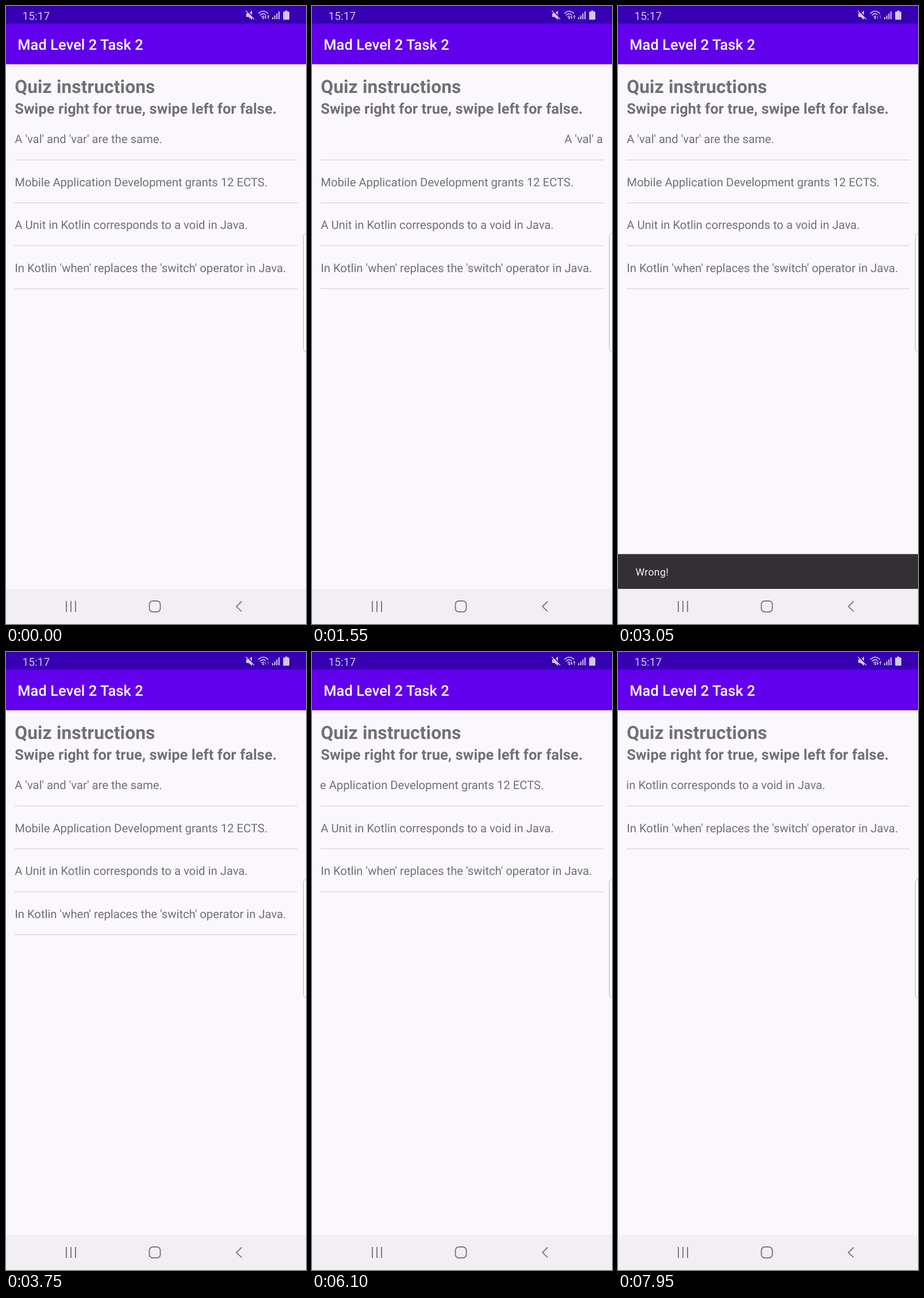
Recreate the animation shown at these times as an HTML page. Size 522x1073 px, loop 8000 ms.

```html
<!DOCTYPE html>
<html lang="en">
<head>
<meta charset="utf-8">
<title>Quiz</title>
<style>
  html, body { margin: 0; width: 100%; height: 100%; overflow: hidden; background: #faf8fc; }
  svg { display: block; width: 100%; height: 100%; }
  text { font-family: Roboto, Arial, sans-serif; text-rendering: geometricPrecision; white-space: pre; }
  .grey { fill: #717075; }
  .head { letter-spacing: .004em; }
  .item { font-size: 20.3px; letter-spacing: -.015px; }
  .nav { fill: none; stroke: #7f7d82; stroke-width: 2; }
  .status { fill: #d3c8ef; }
  .thin { fill: none; stroke: #d3c8ef; stroke-width: 1.6; }
  #traffic { stroke: #3700b3; stroke-width: 1.6; paint-order: stroke; }
</style>
</head>
<body>
<svg viewBox="0 0 522 1073">
  <defs>
    <linearGradient id="shade" x2="0" y2="1">
      <stop offset="0" stop-color="#000" stop-opacity=".14"/>
      <stop offset=".4" stop-color="#000" stop-opacity=".05"/>
      <stop offset="1" stop-color="#000" stop-opacity="0"/>
    </linearGradient>
    <clipPath id="listClip"><rect x="15" y="200" width="492" height="500"/></clipPath>
  </defs>
  <rect width="522" height="1073" fill="#faf8fc"/>

  <!-- bars -->
  <rect y="101" width="522" height="5" fill="url(#shade)"/>
  <rect width="522" height="101" fill="#6200ee"/>
  <rect width="522" height="30.5" fill="#3700b3"/>
  <text class="status" x="28.6" y="23.6" font-size="19.1">15:17</text>
  <text class="head" x="20.3" y="76" font-size="25.37" font-weight="500" fill="#fff">Mad Level 2 Task 2</text>

  <!-- muted speaker -->
  <path class="status" d="M418 13h4l6-5v16l-6-5h-4z"/>
  <path d="M418.2 7.2L433 22" stroke="#3700b3" stroke-width="2"/>
  <path class="thin" d="M417.3 8.5L431.8 23"/>
  <!-- wifi with traffic arrows -->
  <path class="thin" d="M439 13.2Q447.5 4.8 456 13.2M441.8 16.2Q447.5 10.6 453.2 16.2M444.6 19Q447.5 16.2 450.4 19"/>
  <circle class="status" cx="447.5" cy="21" r="1.6"/>
  <path id="traffic" d="M451 15.6v3.8h-1.5l2.1 3 2.1-3h-1.5v-3.8zM455.9 22.4v-3.8h-1.5l2.1-3 2.1 3h-1.5v3.8z"/>
  <!-- signal and battery -->
  <path class="status" d="M463 19.5h2V23h-2zM466.7 16.5h2V23h-2zM470.4 13h2V23h-2zM474.1 9.5h2V23h-2z"/>
  <path class="status" d="M485.6 8h4v1.8h2.2q1.2 0 1.2 1.2v11.6q0 1.2-1.2 1.2h-8.4q-1.2 0-1.2-1.2V11q0-1.2 1.2-1.2h2.2z"/>

  <g class="grey" font-weight="700">
    <text class="head" x="15.2" y="150.8" font-size="31.7">Quiz instructions</text>
    <text class="head" x="15.2" y="186.7" font-size="25.37">Swipe right for true, swipe left for false.</text>
  </g>
  <g id="list" clip-path="url(#listClip)"></g>
  <rect x="517.4" y="394.5" width="20" height="206" rx="6" fill="#fdfcfe" stroke="#b1b0b4"/>

  <g id="snack">
    <rect y="951.6" width="522" height="62" fill="#323033"/>
    <text id="message" x="30.4" y="988.8" font-size="17.76" letter-spacing=".316" fill="#f1f0f2">Wrong!</text>
  </g>

  <rect y="1012" width="522" height="61" fill="#f1eff3"/>
  <path class="nav" d="M105 1033v19M113 1033v19M121 1033v19"/>
  <rect class="nav" x="249.5" y="1033" width="19" height="19" rx="5.8"/>
  <path class="nav" d="M410 1033.8L401 1042.6L410 1051.4"/>
</svg>
<script>
const $ = id => document.getElementById(id);
const LOOP = 8000, STEP = 50, LEFT = 15.2, PITCH = 74.45, WIDTH = 492;
const questions = [
  "A 'val' and 'var' are the same.",
  "Mobile Application Development grants 12 ECTS.",
  "A Unit in Kotlin corresponds to a void in Java.",
  "In Kotlin 'when' replaces the 'switch' operator in Java."
];

const clamp = v => Math.min(1, Math.max(0, v));
const linear = p => p;
const smooth = p => (1 - Math.cos(p * Math.PI)) / 2;

// cubic-bezier(.4, 0, .2, 1)
function standard(p) {
  let lo = 0, hi = 1;
  for (let i = 0; i < 24; i++) {
    const u = (lo + hi) / 2, v = 1 - u;
    if (1.2 * v * v * u + .6 * v * u * u + u ** 3 < p) lo = u; else hi = u;
  }
  return lo * lo * (3 - 2 * lo);
}

// Top row: drag, release, settle [start, end, from, to, ease]
const swipes = [
  [850, 1450, 0, 388, smooth],
  [1450, 1750, 388, WIDTH, p => smooth(clamp(p * 1.2))],
  [3750, 4030, 0, -110, linear],
  [4030, 4350, -110, -WIDTH, p => smooth(clamp(p * 1.28))],
  [6050, 6190, 0, -145, linear],
  [6190, 6500, -145, -WIDTH, p => smooth(clamp(p * 1.24))],
  [7900, 8000, 0, -120, linear]
];

function swipeX(t) {
  const s = swipes.find(([start, end]) => t >= start && t < end);
  if (!s) return 0;
  const [start, end, from, to, ease] = s;
  return from + (to - from) * ease((t - start) / (end - start));
}

function add(tag, attrs) {
  const el = document.createElementNS("http://www.w3.org/2000/svg", tag);
  for (const k in attrs) el.setAttribute(k, attrs[k]);
  return $("list").appendChild(el);
}

const rows = questions.map((q, i) => {
  const label = add("text", { class: "item grey", y: 238.4 + i * PITCH });
  const line = add("rect", { x: 15, y: 266.7 + i * PITCH, width: WIDTH, height: 1.3, fill: "#d8d6da" });
  return { label, line };
});

function draw(t) {
  const answered = t < 4350 ? 0 : t < 6500 ? 1 : 2;
  rows.forEach(({ label, line }, i) => {
    label.textContent = questions[i + answered] || "";
    label.setAttribute("x", LEFT + (i ? 0 : swipeX(t)));
    line.setAttribute("visibility", i + answered < questions.length ? "visible" : "hidden");
  });

  const shown = t < 3500 ? standard(clamp((t - 1750) / 250)) : 1 - standard(clamp((t - 3500) / 250));
  $("snack").setAttribute("transform", `translate(0 ${62 * (1 - shown)})`);
  $("message").setAttribute("opacity", t < 3500 ? clamp((t - 1820) / 180) : 1 - clamp((t - 3500) / 180));
  $("traffic").setAttribute("fill", t >= 3050 && t < 5100 ? "#7650cc" : "#d3c8ef");
}

const origin = performance.now();
function tick() {
  const t = (performance.now() - origin) % LOOP;
  draw(Math.floor(t / STEP) * STEP);
  requestAnimationFrame(tick);
}
tick();
</script>
</body>
</html>
```
